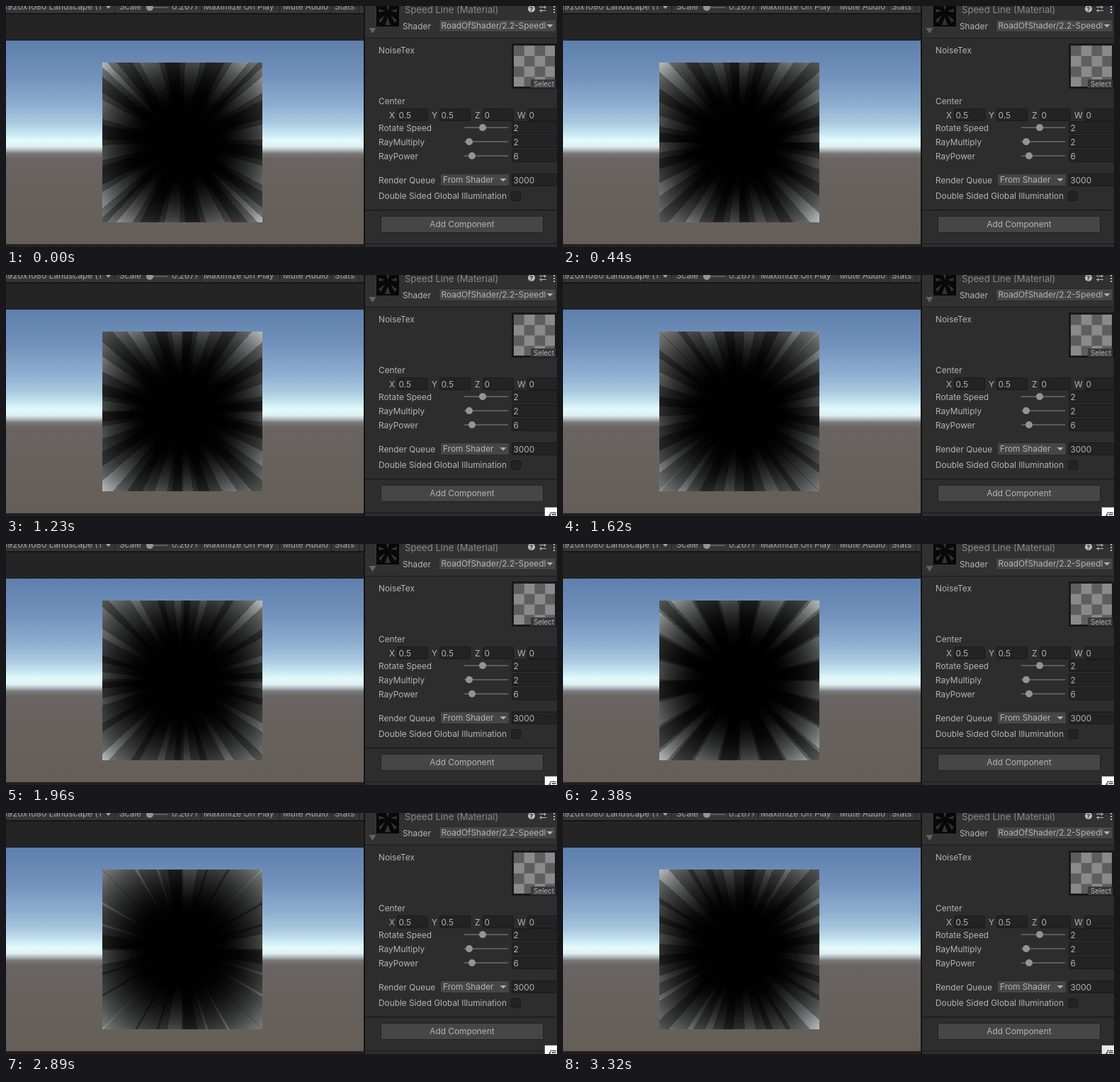
Recreate the animation shown at these times as an HTML page with a canvas. Size 778 px wide and 341 px high, loop 3.4 s.

```html
<!DOCTYPE html>
<html lang="en">
<head>
<meta charset="utf-8">
<title>Speed lines</title>
<style>
html, body { margin: 0; width: 100%; height: 100%; overflow: hidden; background: #242424; }
#stage { position: relative; width: 778px; height: 341px; overflow: hidden; }
svg, canvas { position: absolute; left: 0; top: 0; display: block; }
#rays { left: 136px; top: 80px; }
text { font: 11.85px Inter, sans-serif; fill: #b4b4b4; white-space: pre; }
.bar text { fill: #a4a4a4; }
.field { fill: #232323; stroke: #1a1a1a; }
.drop { fill: #464646; stroke: #292929; }
.track { stroke: #5c5c5c; stroke-width: 2; }
.knob { fill: #949494; }
#tip { animation: tip 3400ms step-end infinite; }
#tip text { font: 12px "Noto Sans CJK SC", "Noto Sans CJK", sans-serif; fill: #222; }
@keyframes tip {
  0% { opacity: 0; }
  19.412% { opacity: .25; }
  21.176% { opacity: .5; }
  22.941% { opacity: .75; }
  24.706% { opacity: 1; }
  97.647% { opacity: .9; }
}
</style>
</head>
<body>
<div id="stage">
<svg width="778" height="341" viewBox="0 0 778 341">
  <defs>
    <linearGradient id="sky" x1="0" y1="49" x2="0" y2="337" gradientUnits="userSpaceOnUse">
      <stop offset="0" stop-color="#5f7fac"/>
      <stop offset=".177" stop-color="#7292bd"/>
      <stop offset=".316" stop-color="#8eaed0"/>
      <stop offset=".403" stop-color="#aac9e0"/>
      <stop offset=".455" stop-color="#c8e6f0"/>
      <stop offset=".49" stop-color="#e2fafc"/>
      <stop offset=".52" stop-color="#e0f0f2"/>
      <stop offset=".538" stop-color="#b0b8bc"/>
      <stop offset=".555" stop-color="#787778"/>
      <stop offset=".58" stop-color="#696462"/>
      <stop offset="1" stop-color="#655e58"/>
    </linearGradient>
    <pattern id="check" x="717" y="56" width="29.5" height="29.5" patternUnits="userSpaceOnUse">
      <path fill="#8a8a8a" d="M0 0h29.5v29.5H0z"/>
      <path fill="#5e5e5e" d="M0 0h14.75v14.75H0zM14.75 14.75h14.75v14.75H14.75z"/>
    </pattern>
  </defs>

  <path fill="#242424" d="M0 0h778v341H0z"/>
  <path fill="url(#sky)" d="M0 49h505v288H0z"/>
  <path fill="#241f1f" d="M0 337h505v4H0z"/>

  <g class="bar">
    <path fill="#363636" d="M0 0h505v10H0z"/>
    <path fill="#161616" d="M0 10h505v2H0z"/>
    <path stroke="#222" d="M153.500 0v10M275.500 0v10M386.500 0v10M459.500 0v10M498.500 0v10"/>
    <text x="-3" y="5">1920x1080 Landscape (1</text>
    <path fill="#a4a4a4" d="M141 0h7l-3.500 4z"/>
    <text x="160" y="5">Scale</text>
    <path class="track" d="M198 2h31"/>
    <circle class="knob" cx="203" cy="2" r="5"/>
    <text x="234" y="5">0.267</text>
    <path fill="none" stroke="#a4a4a4" d="M267 0l3 2l-3 3"/>
    <text x="279" y="5">Maximize On Play</text>
    <text x="391" y="5">Mute Audio</text>
    <text x="464" y="5">Stats</text>
  </g>

  <path fill="#141414" d="M505 0h2v341h-2z"/>
  <path fill="#2d2d2d" d="M507 0h271v341H507z"/>
  <path fill="#313131" d="M507 0h271v45H507z"/>
  <path fill="#1b1b1b" d="M507 45h271v1H507zM507 288h271v1.500H507zM507 336h271v1H507z"/>

  <path fill="#080808" d="M523 0h32v29h-32z"/>
  <path fill="#343434" d="M526 4l9 3-8 2zM552 4l-9 3 8 2zM526 20l9-7-6 11zM552 20l-9-7 6 11zM537 0l2 7 2-7zM535 27l4-11 4 11z"/>
  <path fill="#646464" d="M512.500 31h10l-5 8z"/>
  <text x="563" y="10" style="font-size:13.1px;fill:#888">Speed Line (Material)</text>
  <circle cx="742" cy="4" r="5" fill="#bbb"/>
  <text x="739.300" y="7.500" style="font-size:9px;font-weight:700;fill:#313131">?</text>
  <path stroke="#bbb" d="M753 1.500h10M753 6.500h10M760.500-1v5M755.500 4v5"/>
  <path fill="#bbb" d="M773 0h2v2h-2zM773 4h2v2h-2zM773 8h2v2h-2z"/>
  <text x="560" y="33">Shader</text>
  <rect class="drop" x="611.500" y="19.500" width="165" height="17" rx="2"/>
  <text x="614.500" y="32">RoadOfShader/2.2-Speedl</text>
  <path fill="#b0b0b0" d="M763.500 26h9l-4.500 4.500z"/>

  <text x="526" y="67">NoiseTex</text>
  <path fill="#191919" d="M714 53h64v64h-64z"/>
  <path fill="url(#check)" d="M717 56h58v58h-58z"/>
  <path fill="#3a3a3a" d="M741 104h35v12h-35z"/>
  <text x="745" y="114" style="font-size:9.8px">Select</text>

  <text x="526" y="139">Center</text>
  <g id="axes"></g>
  <g id="sliders"></g>

  <text x="526" y="251">Render Queue</text>
  <rect class="drop" x="613.500" y="237.500" width="97" height="17" rx="2"/>
  <text x="617" y="250">From Shader</text>
  <path fill="#b0b0b0" d="M697.500 244h9l-4.500 4.500z"/>
  <rect class="field" x="714.500" y="237.500" width="70" height="17" rx="2"/>
  <text x="716.500" y="251">3000</text>
  <text x="526" y="273">Double Sided Global Illumination</text>
  <rect class="field" x="713.500" y="262.500" width="13" height="13" rx="2"/>
  <rect x="529.500" y="297.500" width="229" height="23" rx="2" fill="#464646" stroke="#222"/>
  <text x="644" y="313" text-anchor="middle">Add Component</text>

  <g id="tip">
    <path fill="#fff" stroke="#555" d="M760.500 328.500h20v15h-20z"/>
    <text x="766" y="346">停</text>
  </g>
</svg>
<canvas id="rays" width="226" height="226"></canvas>
</div>
<script>
const LOOP = 3400;
const STEPS = [0, 220, 440, 660, 720, 780, 840, 1030, 1230, 1420, 1620, 1780,
  1960, 2160, 2380, 2520, 2690, 2890, 3130, 3320];
const SIZE = 226, START = -1.6045, SPEED = 2, MULTIPLY = 2, POWER = 6;
const DARK = 0.111, LIGHT = 0.254;

const field = (x, y, w, value) =>
  `<rect class="field" x="${x + .5}" y="${y + .5}" width="${w}" height="17" rx="2"/>
   <text x="${x + 2.5}" y="${y + 14}">${value}</text>`;

document.getElementById('axes').innerHTML =
  [['X', 541, 552, .5], ['Y', 601, 612, .5], ['Z', 662, 673, 0], ['W', 722, 736, 0]]
    .map(([name, x, fx, v]) => `<text x="${x}" y="159">${name}</text>` + field(fx, 145, 43, v))
    .join('');

document.getElementById('sliders').innerHTML =
  [['Rotate Speed', 172, 673, 2], ['RayMultiply', 192, 654, 2], ['RayPower', 212, 658, 6]]
    .map(([name, y, knob, v]) => `<text x="526" y="${y + 5}">${name}</text>
      <path class="track" d="M647 ${y}h62"/>
      <circle class="knob" cx="${knob}" cy="${y}" r="5"/>` + field(714, y - 9, 70, v))
    .join('');

const ctx = document.getElementById('rays').getContext('2d');
const image = ctx.createImageData(SIZE, SIZE);

const checker = (x, y) => (Math.floor(4 * x) + Math.floor(4 * y)) & 1 ? DARK : LIGHT;
const toSrgb = v => 255 * (v <= .0031308 ? 12.92 * v : 1.055 * v ** (1 / 2.4) - .055);

// Two checker samples on the unit circle, turned in opposite directions.
function drawRays(ms) {
  const angle = START + SPEED * ms / 1000;
  const c = Math.cos(angle), s = Math.sin(angle);
  for (let j = 0, k = 0; j < SIZE; j++) {
    for (let i = 0; i < SIZE; i++, k += 4) {
      const x = (i + .5) / SIZE - .5, y = .5 - (j + .5) / SIZE;
      const r = Math.hypot(x, y), u = x / r, v = y / r;
      const noise = checker(c * u - s * v, s * u + c * v) * checker(c * u + s * v, c * v - s * u);
      const level = toSrgb(Math.min(1, noise * (MULTIPLY * r) ** POWER));
      image.data[k] = level * (1 - .05 * level / 255);
      image.data[k + 1] = image.data[k + 2] = level;
      image.data[k + 3] = 255;
    }
  }
  ctx.putImageData(image, 0, 0);
}

const tip = document.getElementById('tip').getAnimations()[0];
let shown = -1;
function tick() {
  const now = performance.now() % LOOP;
  const step = STEPS.findLast(t => t <= now);
  if (tip) tip.currentTime = now;
  if (step !== shown) drawRays(shown = step);
  requestAnimationFrame(tick);
}
tick();
</script>
</body>
</html>
```
